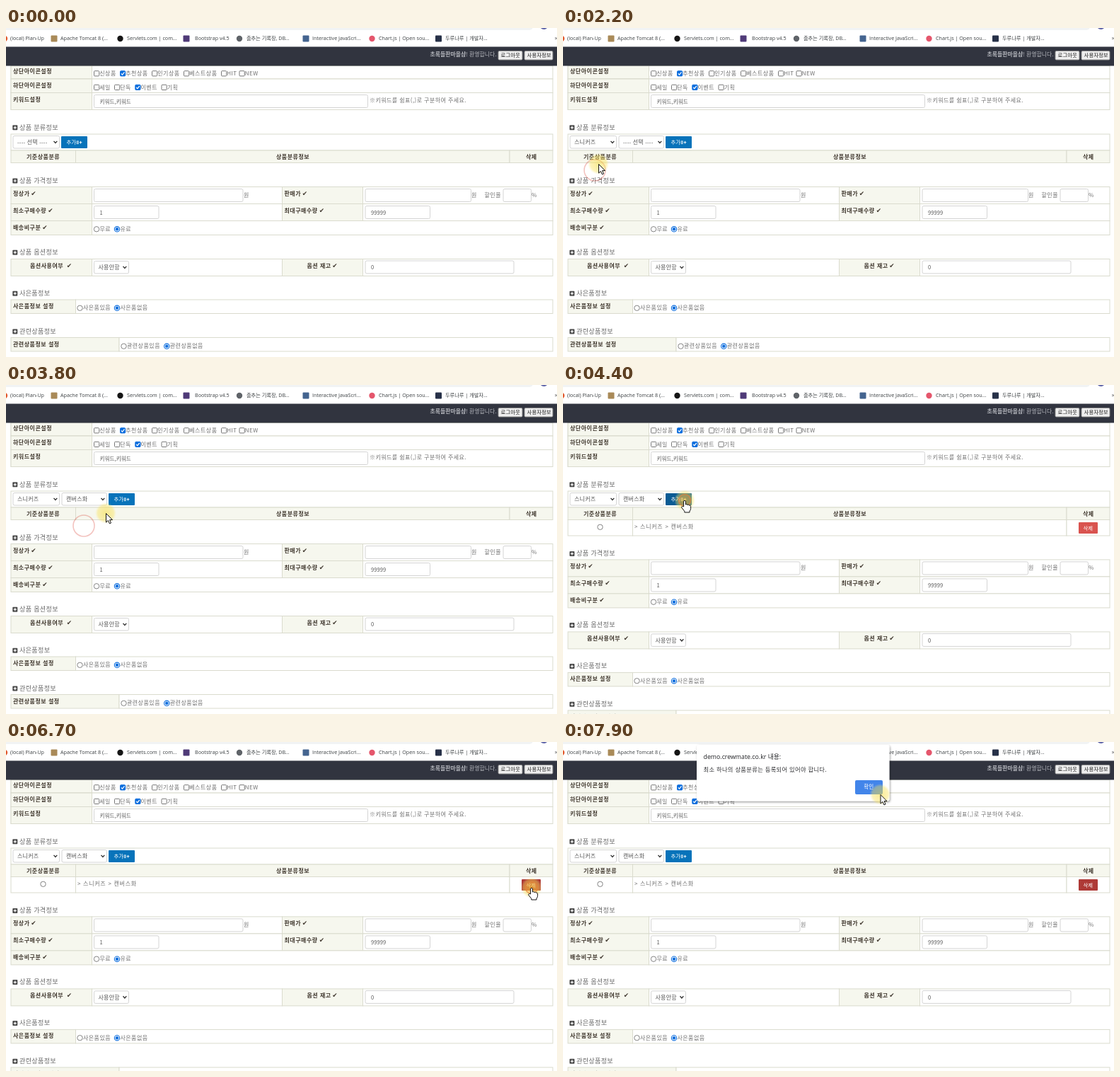
An HTML page for the animation above (8000 ms loop, 779 by 465 pixels).

```html
<!DOCTYPE html>
<html lang="ko">
<head>
<meta charset="utf-8">
<title>상품 분류 등록</title>
<style>
html, body { margin: 0; width: 100%; height: 100%; overflow: hidden; background: #fff; }
svg { display: block; width: 779px; height: 465px; }
text { font-family: 'Noto Sans CJK KR', 'Noto Sans KR', 'Noto Sans', sans-serif; white-space: pre; }
.ui { font-family: 'Open Sans', 'Noto Sans CJK KR', sans-serif; }
.tick { font-family: 'DejaVu Sans', sans-serif; }
</style>
</head>
<body>
<svg id="stage" viewBox="0 0 779 465" xmlns="http://www.w3.org/2000/svg">
  <defs>
    <radialGradient id="glow">
      <stop offset="0" stop-color="#f7dc3c" stop-opacity=".55"/>
      <stop offset=".75" stop-color="#f9e257" stop-opacity=".42"/>
      <stop offset="1" stop-color="#fbeb86" stop-opacity="0"/>
    </radialGradient>
    <filter id="shade" x="-20%" y="-20%" width="140%" height="140%">
      <feDropShadow dx="1" dy="1.5" stdDeviation="1.6" flood-opacity=".4"/>
    </filter>
  </defs>
</svg>
<script>
const LOOP = 8000, STEP = 100, ROW = 22.4;
const INK = '#40382f', GRAY = '#707070', LINE = '#dadbce', HEAD = '#f6f7ee';
const BLUE = '#0773ba', BLUE_DARK = '#0a5b94', RED = '#d9534f', RED_DARK = '#ae3a36';
const stage = document.getElementById('stage');

function el(parent, tag, attrs = {}, content = '') {
  const node = document.createElementNS('http://www.w3.org/2000/svg', tag);
  for (const key in attrs) node.setAttribute(key, attrs[key]);
  node.textContent = content;
  parent.append(node);
  return node;
}
const group = (parent = stage, attrs) => el(parent, 'g', attrs);
const show = (node, on) => node.setAttribute('visibility', on ? 'visible' : 'hidden');

// Text placed by its left edge and vertical centre
function text(g, x, cy, str, { size = 8, gap = .5, fill = GRAY, ...rest } = {}) {
  return el(g, 'text', { x, y: cy + size * .37, 'font-size': size, 'letter-spacing': gap, fill, ...rest }, str);
}
function box(g, x, y, x2, y2, fill = '#fff', stroke = 'none', rx = 0) {
  return el(g, 'rect', { x, y, width: x2 - x, height: y2 - y, fill, stroke, rx });
}
const cell = (g, x, y, x2, y2, head) => box(g, x, y, x2, y2, head ? HEAD : '#fff', LINE);
const bold = (g, x, cy, str) => text(g, x, cy, str, { fill: INK, 'font-weight': 700 });
function label(g, x, cy, str, tickX) {
  bold(g, x, cy, str);
  if (tickX) text(g, tickX - .7, cy, '✔', { size: 8.8, gap: 0, fill: INK, class: 'tick' });
}
function heading(g, cy, str) {
  box(g, 9.3, cy - 3, 16.3, cy + 4, '#4c4c4c', 'none', 1);
  el(g, 'path', { d: `M10.8 ${cy + .5}h4M12.8 ${cy - 1.5}v4`, stroke: '#fff', 'stroke-width': 1.2 });
  text(g, 19, cy, str, { size: 9.1, gap: .3, fill: '#6c6c6c' });
}
function field(g, x, y, x2, str = '') {
  box(g, x, y, x2, y + 18, '#fff', '#d4d4d4', 2);
  text(g, x + 8, y + 9.4, str, { size: 7.5, gap: .1, fill: '#555' });
}
function select(g, x, y, x2, str) {
  box(g, x, y, x2, y + 17.5, '#fff', '#d4d4d4', 2);
  el(g, 'path', { d: `M${x2 - 8} ${y + 7.4}l2.4 2.6 2.4-2.6`, fill: 'none', stroke: '#333', 'stroke-width': 1.4 });
  return text(g, x + 6, y + 9, str, { gap: .25, fill: '#555', class: 'ui' });
}
function check(g, x, cy, str, on) {
  box(g, x + .5, cy - 3.3, x + 7.7, cy + 3.9, on ? '#0f6fde' : '#fff', on ? '#0f6fde' : '#777', 1);
  if (on) el(g, 'path', { d: `M${x + 1.9} ${cy + .4}l1.6 1.7 3-3.7`, fill: 'none', stroke: '#fff', 'stroke-width': 1.2 });
  text(g, x + 8.2, cy, str);
}
function radio(g, cx, cy, str, on) {
  el(g, 'circle', { cx, cy: cy + .3, r: 3.7, fill: '#fff', stroke: on ? '#0f6fde' : '#777', 'stroke-width': on ? 1.1 : .9 });
  if (on) el(g, 'circle', { cx, cy: cy + .3, r: 2.3, fill: '#0f6fde' });
  text(g, cx + 4.4, cy, str);
}

// Browser bar
function drawBrowser(g) {
  box(g, -10, -10, 745, 3, '#f1f3f4', 'none', 5);
  el(g, 'circle', { cx: 760.5, cy: -4.5, r: 6.5, fill: '#5d63a8' });
  const marks = [
    [-2, '#e2572b', 1, 6, '(local) Plan-Up'],
    [68, '#a98a58', 0, 77, 'Apache Tomcat 8 (...'],
    [161.5, '#151515', 1, 171, 'Servlets.com | com...'],
    [255, '#4f3a78', 0, 267, 'Bootstrap v4.5'],
    [330, '#5f6368', 1, 340, '춤추는 기록장, DB...'],
    [424, '#44648f', 0, 433, 'Interactive JavaScri...'],
    [517.5, '#e5566c', 1, 527, 'Chart.js | Open sou...'],
    [611.5, '#273148', 0, 621, '두루나루 | 개발자...']
  ];
  for (const [cx, fill, round, x, str] of marks) {
    if (round) el(g, 'circle', { cx, cy: 15, r: 4.2, fill });
    else box(g, cx - 4.5, 10.5, cx + 4.5, 19.5, fill, 'none', 1);
    text(g, x, 14.8, str, { size: 7.2, gap: 0, fill: '#3c4043', class: 'ui' });
  }
  text(g, 775.5, 14.5, '»', { size: 8, gap: 0, fill: '#444' });
}

function drawHeader(g) {
  box(g, 0, 26.5, 779, 53.5, '#31343f');
  const hello = text(g, 599.5, 37.3, '', { size: 7.9, gap: 0, fill: '#b4b6bc' });
  el(hello, 'tspan', { 'font-weight': 700 }, '초록들판마을샵');
  el(hello, 'tspan', {}, '! 환영합니다.');
  for (const [x, x2, str] of [[696, 730, '로그아웃'], [733, 773, '사용자정보']]) {
    box(g, x, 32.5, x2, 45, '#efefef', '#8b8b8b', 1.5);
    text(g, x + 3.6, 38.6, str, { size: 7.4, gap: 0, fill: '#222' });
  }
}

function drawTop(g) {
  [[53.5, 72, 61.5, '상단아이콘설정'], [72, 91.5, 81, '하단아이콘설정'], [91.5, 115.5, 100.7, '키워드설정']]
    .forEach(([y, y2, cy, str]) => {
      cell(g, 7, y, 773, y2);
      cell(g, 7, y, 121.5, y2, true);
      bold(g, 10, cy, str);
    });
  [[124, '신상품'], [161, '추천상품', 1], [206, '인기상품'], [251, '베스트상품'], [304, 'HIT'], [329.5, 'NEW']]
    .forEach(([x, str, on]) => check(g, x, 64, str, on));
  [[124, '세일'], [153, '단독'], [182.3, '이벤트', 1], [219.5, '기획']]
    .forEach(([x, str, on]) => check(g, x, 83.6, str, on));
  field(g, 124.5, 94.5, 511.5, '키워드,키워드');
  text(g, 514, 102.4, '※키워드를 쉼표(,)로 구분하여 주세요.', { gap: .42 });
  heading(g, 140.3, '상품 분류정보');
  cell(g, 7, 150, 773, 173);
  cell(g, 7, 173, 98.5, 190.5, true);
  cell(g, 98.5, 173, 712, 190.5, true);
  cell(g, 712, 173, 773, 190.5, true);
  bold(g, 29, 182, '기준상품분류');
  bold(g, 382, 182, '상품분류정보');
  bold(g, 735, 182, '삭제');
}

function drawRest(g) {
  const C = [7, 121.5, 390.5, 504.5, 773];
  const split = (y, y2) => C.slice(1).forEach((x, i) => cell(g, C[i], y, x, y2, i % 2 === 0));
  const wide = (y, y2, x) => { cell(g, 7, y, x, y2, true); cell(g, x, y, 773, y2); };

  heading(g, 215.5, '상품 가격정보');
  split(224.5, 248.5);
  split(248.5, 272.5);
  wide(272.5, 292.5, 121.5);
  label(g, 10, 233.7, '정상가', 36);
  field(g, 124.5, 227.5, 335);
  text(g, 336, 236, '원');
  label(g, 393.5, 233.7, '판매가', 419.5);
  field(g, 508, 227.5, 657.5);
  text(g, 658, 236, '원');
  text(g, 676.5, 236, '할인율');
  field(g, 703, 227.5, 742.5);
  text(g, 743, 236, '%');
  label(g, 10, 257.8, '최소구매수량', 60);
  field(g, 124.5, 251.5, 216, '1');
  label(g, 393.5, 257.8, '최대구매수량', 443.5);
  field(g, 508, 251.5, 599.5, '99999');
  label(g, 10, 281.8, '배송비구분', 52);
  radio(g, 128, 284, '무료');
  radio(g, 157, 284, '유료', true);

  heading(g, 316.7, '상품 옵션정보');
  split(326.5, 350.5);
  label(g, 34, 335.6, '옵션사용여부', 86.5);
  select(g, 124.5, 329.5, 173.5, '사용안함');
  label(g, 425.5, 335.6, '옵션 재고', 462);
  field(g, 508, 329, 718, '0');

  heading(g, 374.7, '사은품정보');
  wide(384, 403.5, 98.5);
  bold(g, 10, 392.8, '사은품정보 설정');
  radio(g, 104.5, 395.5, '사은품있음');
  radio(g, 157, 395.5, '사은품없음', true);

  heading(g, 428.4, '관련상품정보');
  wide(437.5, 457, 160);
  bold(g, 10, 446.8, '관련상품정보 설정');
  radio(g, 166.5, 449.5, '관련상품있음');
  radio(g, 227.3, 449.5, '관련상품없음', true);
}

const page = group();
drawBrowser(page);
drawTop(page);
drawHeader(page);
const rest = group();
drawRest(rest);

// Added category row
const added = group();
cell(added, 7, 190.5, 98.5, 213);
cell(added, 98.5, 190.5, 712, 213);
cell(added, 712, 190.5, 773, 213);
radio(added, 52.5, 200.5, '');
text(added, 101, 199.8, '> 스니커즈 > 캔버스화', { gap: .72 });
const removeBtn = box(added, 729, 194, 756, 210, RED, 'none', 1);
text(added, 735.5, 202.2, '삭제', { size: 7.4, gap: 0, fill: '#fff' });

// Category pickers
const NONE = '---- 선택 ----';
const first = select(stage, 10, 152.5, 75.5, '');
const second = group();
const secondText = select(second, 79, 152.5, 142.5, '');
const addBtn = group();
const addFace = box(addBtn, 78, 153, 115, 170, BLUE, 'none', 1);
text(addBtn, 85.5, 161.5, '추가', { size: 7.4, gap: 0, fill: '#fff' });
el(addBtn, 'path', { d: 'M99.5 160h3.4M99.5 161.7h3.4M99.5 163.4h3.4M103.6 161.7h3.8M105.5 159.8v3.8', stroke: '#fff', 'stroke-width': .9 });

const blackList = group(stage, { filter: 'url(#shade)' });
box(blackList, 10, 170, 76, 346.5, '#000');

const OPTION_H = 19.5, OPTION_Y = 170.5;
const list = group(stage, { filter: 'url(#shade)' });
box(list, 79.5, 170.5, 142.5, 327, '#fff', '#858585');
const marker = box(list, 80, 171, 142, 171 + OPTION_H - .5, '#1e90ff');
const options = [NONE, '캔버스화', '슬립온', '데크슈즈', '플랫', '벨크로', '레더', '시즌용품']
  .map((str, i) => text(list, 85, 180.2 + i * OPTION_H, str, { gap: .25, class: 'ui' }));

// Alert
const dialog = group();
box(dialog, 189, 4, 461.5, 83.5, '#fff', 'none', 3).setAttribute('filter', 'url(#shade)');
text(dialog, 198.5, 21, 'demo.crewmate.co.kr 내용:', { size: 8.8, gap: 0, fill: '#202124', class: 'ui' });
text(dialog, 198.5, 38.7, '최소 하나의 상품분류는 등록되어 있어야 합니다.', { size: 8.3, gap: .3, fill: '#303134' });
const okFace = box(dialog, 413, 54, 452, 74, '#4a8cf0', 'none', 2);
text(dialog, 425.3, 63.6, '확인', { size: 7.6, gap: 0, fill: '#fff' });

// Pointer
const ring = el(stage, 'circle', { stroke: '#d8382b' });
const pointer = group();
el(pointer, 'circle', { r: 15, fill: 'url(#glow)' });
const outline = { fill: '#fff', stroke: '#111', 'stroke-width': 1, 'stroke-linejoin': 'round' };
const arrow = el(pointer, 'path', { d: 'M.5.5V13.1L3.4 10.4 5.4 14.9 7.5 14 5.6 9.6H9.5Z', ...outline });
const hand = el(pointer, 'path', {
  d: 'M-1.4 9V1.2Q0-.6 1.4 1.2V6Q2.8 5 4 6.4 5.4 5.6 6.4 7 8.4 6.6 8.6 8.6V11.5Q8.4 14 7 15.2V17H-.2V15.4L-4.4 10Q-4 7.4-1.4 9Z',
  ...outline
});

const PATH = [
  [0, -30, 100], [100, -12, 115], [700, 29, 160], [1200, 29, 160], [1700, 45, 201], [2000, 45, 201],
  [2200, 50, 192], [2700, 118, 161], [2900, 118, 161], [3200, 110, 199], [3700, 110, 199],
  [3900, 172, 163], [4700, 172, 163], [5400, 741, 207], [5600, 741, 207], [5800, 764, 212],
  [6100, 743, 206], [6900, 743, 206], [7500, 473, 78], [7900, 448.5, 74], [8000, 448.5, 74]
];
const CLICKS = [1000, 2000, 2700, 3600, 4400, 6700];
// Radius, opacity and fill for each step after a press
const RINGS = [[8.5, .75, 'rgba(225,70,30,.38)'], [13.5, .8, 'none'], [15, .3, 'none']];

function pointAt(t) {
  const i = Math.max(1, PATH.findIndex(p => p[0] >= t));
  const [t0, x0, y0] = PATH[i - 1], [t1, x1, y1] = PATH[i];
  const k = (t - t0) / (t1 - t0), e = k * k * (3 - 2 * k);
  return [x0 + (x1 - x0) * e, y0 + (y1 - y0) * e];
}
const inside = ([x, y], x1, y1, x2, y2) => x >= x1 && x <= x2 && y >= y1 && y <= y2;

function render(t) {
  const p = pointAt(t);
  const chosen = t >= 2000, two = t >= 2100, hasRow = t >= 4300, alert = t >= 6900;
  const open = t >= 2800 && t < 3700;

  first.textContent = chosen ? '스니커즈' : NONE;
  secondText.textContent = t >= 3700 ? '캔버스화' : NONE;
  show(second, two);
  addBtn.setAttribute('transform', `translate(${two ? 67 : 0} 0)`);
  show(blackList, t >= 1000 && t < 2000);
  show(list, open);
  const pick = Math.max(0, Math.floor((p[1] - OPTION_Y) / OPTION_H));
  marker.setAttribute('y', 170.8 + pick * OPTION_H);
  options.forEach((o, i) => o.setAttribute('fill', i === pick ? '#fff' : GRAY));

  show(added, hasRow);
  rest.setAttribute('transform', `translate(0 ${hasRow ? ROW : 0})`);
  show(dialog, alert);

  const onAdd = two && inside(p, 145, 153, 182, 170);
  const onRemove = hasRow && !alert && inside(p, 729, 194, 756, 210);
  addFace.setAttribute('fill', onAdd ? BLUE_DARK : BLUE);
  removeBtn.setAttribute('fill', onRemove || t >= 6700 ? RED_DARK : RED);
  okFace.setAttribute('fill', inside(p, 413, 54, 453, 76) ? '#4285ea' : '#4a8cf0');
  show(arrow, !onAdd && !onRemove);
  show(hand, onAdd || onRemove);
  pointer.setAttribute('transform', `translate(${p[0]} ${p[1]})`);

  const press = CLICKS.find(c => t >= c && t < c + RINGS.length * STEP);
  show(ring, press !== undefined);
  if (press !== undefined) {
    const [r, opacity, fill] = RINGS[(t - press) / STEP];
    const [cx, cy] = pointAt(press);
    Object.entries({ cx, cy, r, opacity, fill, 'stroke-width': 1.6 }).forEach(([k, v]) => ring.setAttribute(k, v));
  }
}

// A small lead keeps each step from showing a refresh late
const start = performance.now() - 30;
function tick() {
  const t = (performance.now() - start) % LOOP;
  render(Math.floor(t / STEP) * STEP);
  requestAnimationFrame(tick);
}
tick();
</script>
</body>
</html>
```
